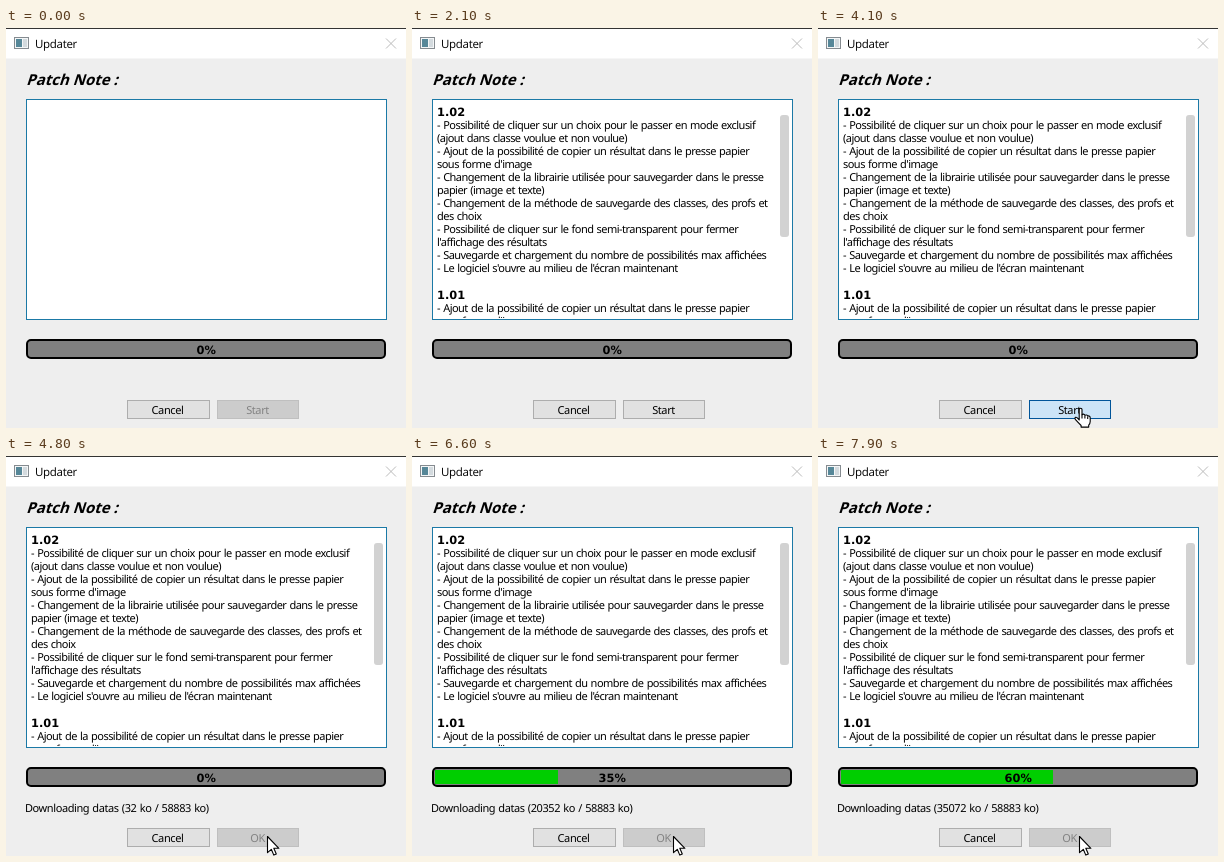
Animation, 400 px wide and 400 px high, one loop 8000 ms. Source, as an HTML page:

```html
<!DOCTYPE html>
<html lang="fr">
<head>
<meta charset="utf-8">
<title>Updater</title>
<style>
  html, body { margin: 0; width: 100%; height: 100%; overflow: hidden; background: #eee; }
  svg { display: block; width: 100vw; height: 100vh; }
  text {
    font: 11px "Noto Sans", "Open Sans", sans-serif;
    letter-spacing: -.53px;
    word-spacing: .8px;
    text-rendering: geometricPrecision;
    white-space: pre;
  }
  .title { font: 11.5px "Open Sans", "Noto Sans", sans-serif; letter-spacing: -.3px; }
  .heading { font-weight: bold; font-size: 15px; letter-spacing: 0; word-spacing: 0; }
  .version, .percent { font: bold 11.4px "DejaVu Sans", sans-serif; letter-spacing: 0; }
  .mid { text-anchor: middle; }
  .button text { letter-spacing: -.39px; }
  #label { letter-spacing: -.42px; }
  .button rect { fill: #e1e1e1; stroke: #adadad; }
  .button.off rect { fill: #ccc; stroke: #bfbfbf; }
  .button.off text { fill: #838383; }
  .button.hover rect { fill: #e5f1fb; stroke: #0078d7; }
  .button.down rect { fill: #cce4f7; stroke: #005499; }
  .pointer { fill: #fff; stroke: #000; stroke-width: 1.1; stroke-linejoin: round; }
</style>
</head>
<body>
<svg viewBox="0 0 400 400">
  <clipPath id="page"><rect x="21" y="72" width="359" height="218"/></clipPath>

  <rect width="400" height="400" fill="#eee"/>
  <rect width="400" height="30.5" fill="#fff"/>
  <rect width="400" height="1" fill="#333"/>

  <rect x="8.5" y="9.5" width="14" height="11" fill="#f4f6f7" stroke="#858b90"/>
  <rect x="10" y="11" width="6" height="8" fill="#568798"/>
  <rect x="17" y="11" width="4" height="8" fill="#d3dade"/>
  <text class="title" x="29" y="20">Updater</text>
  <path d="M380 10.5l10 10m0-10l-10 10" stroke="#bbb" fill="none"/>

  <text class="heading" transform="translate(20 57) skewX(-18)">Patch Note :</text>

  <rect x="20.5" y="71.5" width="360" height="220" fill="#fff" stroke="#1b79a6"/>
  <g id="notes" clip-path="url(#page)">
    <rect x="368" y="87" width="9" height="122" rx="3" fill="#d2d2d2"/>
  </g>

  <rect x="21" y="312" width="358" height="18" rx="4" fill="#808080" stroke="#000" stroke-width="2"/>
  <rect id="fill" x="23" y="314" height="14" fill="#00ce00"/>
  <text id="percent" class="percent mid" x="200.2" y="326"></text>

  <text id="label" x="19" y="356"></text>

  <g class="button">
    <rect x="121.5" y="372.5" width="82" height="18"/>
    <text class="mid" x="161.5" y="386">Cancel</text>
  </g>
  <g class="button" id="action">
    <rect x="211.5" y="372.5" width="81" height="18"/>
    <text class="mid" x="251.5" y="386"></text>
  </g>

  <g id="cursor" class="pointer">
    <path id="arrow" d="M0 0V16.2L3.8 12.8L6.3 18.6L8.8 17.5L6.3 11.8H11.4Z"/>
    <g id="hand">
      <path d="M-.3 11.5V1.2Q-.3 -.3 1.1 -.3T2.5 1.2V6.2Q4.9 4.9 5.4 6.8Q7.6 5.8 8.2 7.5Q10.6 7 10.7 9.3V13Q10.7 15 9.2 16.6V18.6H1.6V17Q-1.2 14.3 -4 11.2Q-5.2 9.5 -3.8 8.8Q-2.6 8.3 -.3 11.5Z"/>
      <path d="M2.5 6V10M5.4 7V10M8.2 8V10.5" fill="none"/>
    </g>
  </g>
</svg>
<script>
const LOOP = 8000, STEP = 100, TOTAL = 58883, BLOCK = 32;
const SHOW = 2000, ENTER = 2700, ARRIVE = 3000, PRESS = 4100, RELEASE = 4200, CONNECT = 4400;
const START = [278, 400], REST = [261.5, 380.5];
// time in ms, kilobytes received
const RECEIVED = [[4800, 32], [5700, 9728], [6600, 20352], [7900, 35072]];
const NOTES = [
  "#1.02",
  "- Possibilité de cliquer sur un choix pour le passer en mode exclusif",
  "(ajout dans classe voulue et non voulue)",
  "- Ajout de la possibilité de copier un résultat dans le presse papier",
  "sous forme d'image",
  "- Changement de la librairie utilisée pour sauvegarder dans le presse",
  "papier (image et texte)",
  "- Changement de la méthode de sauvegarde des classes, des profs et",
  "des choix",
  "- Possibilité de cliquer sur le fond semi-transparent pour fermer",
  "l'affichage des résultats",
  "- Sauvegarde et chargement du nombre de possibilités max affichées",
  "- Le logiciel s'ouvre au milieu de l'écran maintenant",
  "",
  "#1.01",
  "- Ajout de la possibilité de copier un résultat dans le presse papier",
  "sous forme d'image"
];

const $ = id => document.getElementById(id);
const show = (el, on) => el.setAttribute("visibility", on ? "inherit" : "hidden");
const mix = (a, b, k) => a + (b - a) * k;
const action = $("action"), caption = action.querySelector("text");

// A version line is one pixel taller than the others.
let baseline = 74;
for (const line of NOTES) {
  const text = document.createElementNS("http://www.w3.org/2000/svg", "text");
  const bold = line.startsWith("#");
  baseline += bold ? 14 : 13;
  if (bold) text.setAttribute("class", "version");
  text.setAttribute("x", 25);
  text.setAttribute("y", baseline);
  text.textContent = bold ? line.slice(1) : line;
  $("notes").append(text);
}

function received(t) {
  if (t <= RECEIVED[0][0]) return t < CONNECT ? 0 : RECEIVED[0][1];
  const i = RECEIVED.findIndex(([time]) => t <= time);
  const [t0, a] = RECEIVED[i - 1], [t1, b] = RECEIVED[i];
  return Math.round(mix(a, b, (t - t0) / (t1 - t0)) / BLOCK) * BLOCK;
}

function draw(t) {
  show($("notes"), t >= SHOW);

  const k = Math.min(1, Math.max(0, (t - ENTER) / (ARRIVE - ENTER)));
  const x = mix(START[0], REST[0], k), y = mix(START[1], REST[1], k);
  const over = y < 391 && t < RELEASE;
  show($("cursor"), t >= ENTER);
  show($("hand"), over);
  show($("arrow"), !over);
  $("cursor").setAttribute("transform", `translate(${x} ${y})`);

  const state = t < SHOW || t >= RELEASE ? "off" : t >= PRESS ? "down" : over ? "hover" : "";
  action.setAttribute("class", "button " + state);
  caption.textContent = t < RELEASE ? "Start" : "OK";

  const size = received(t), percent = Math.round(size / TOTAL * 100);
  $("fill").setAttribute("width", Math.max(0, Math.round(356 * percent / 100) - 2));
  $("percent").textContent = percent + "%";
  $("label").textContent = t < CONNECT ? "" : `Downloading datas (${size} ko / ${TOTAL} ko)`;
}

const begin = performance.now();
function tick() {
  const t = (performance.now() - begin) % LOOP;
  draw(Math.floor(t / STEP) * STEP);
  requestAnimationFrame(tick);
}
tick();
</script>
</body>
</html>
```
